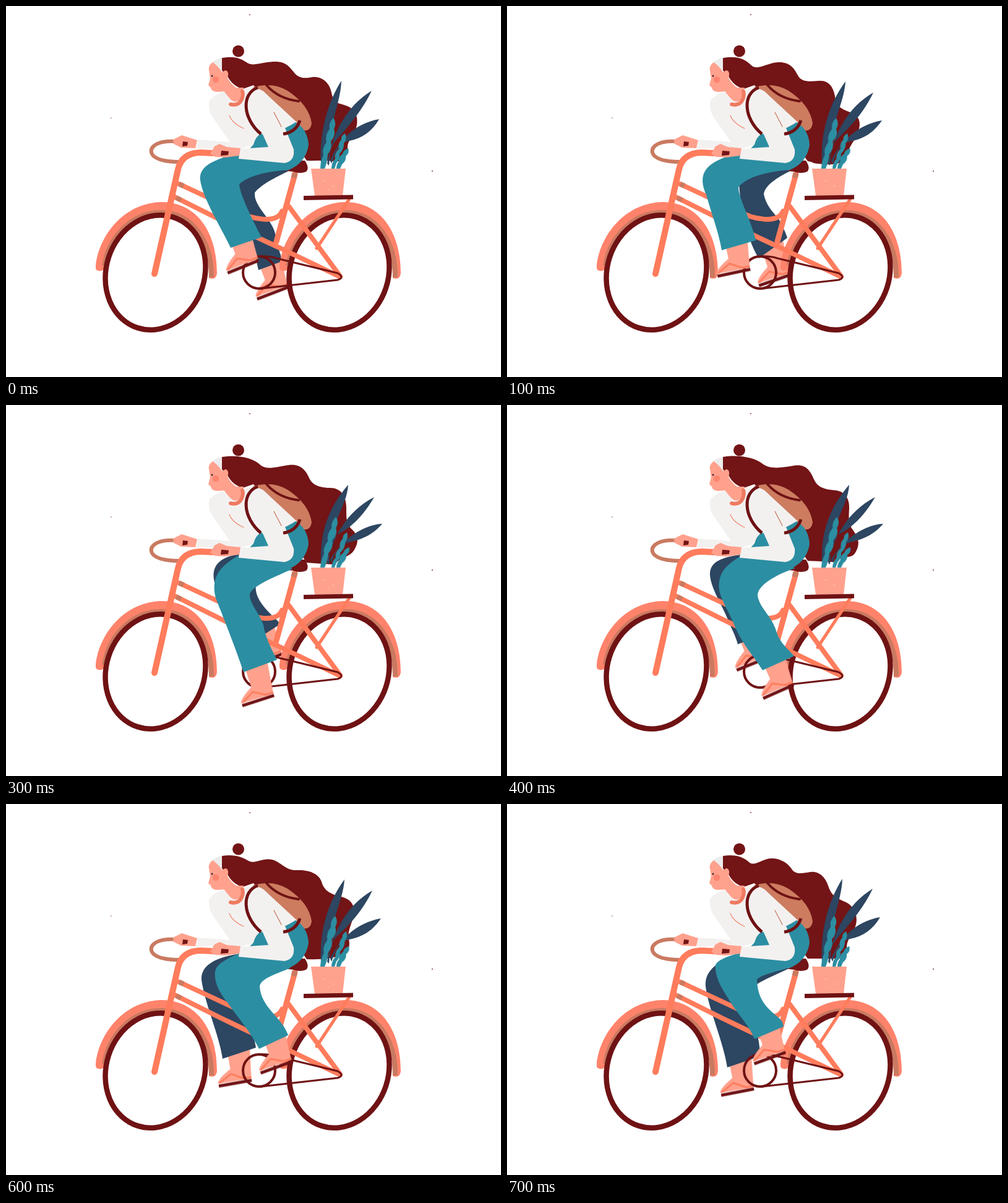
These frames come from a looping animation (800 px wide and 600 px high, 0.8 s). An HTML page:

```html
<!DOCTYPE html>
<html lang="en">
<head>
<meta charset="utf-8">
<title>Cyclist</title>
<style>
html, body { margin: 0; width: 100%; height: 100%; overflow: hidden; background: #fff; }
svg { display: block; width: 100%; height: 100%; }
.wine { fill: #731416; }
.coral { fill: #ff836b; }
.skin { fill: #ffa18d; }
.shirt { fill: #f3f1f0; }
.teal { fill: #2c8ea2; }
.navy { fill: #2d4661; }
.line { fill: none; stroke-linecap: round; stroke-linejoin: round; }
.flat { stroke-linecap: butt; }
.tube { stroke: #ff7c5c; }
.dark { stroke: #6f1214; }
.shade { stroke: #c97a61; }

.hair, .far-leg, .near-leg, .far-foot, .near-foot, .blades, .fronds {
  animation: .8s step-end infinite;
}
.hair { animation-name: hair; }
.far-leg { animation-name: far-leg; }
.near-leg { animation-name: near-leg; }
.far-foot { animation-name: far-foot; }
.near-foot { animation-name: near-foot; }
.blades { animation-name: blades; }
.fronds { animation-name: fronds; transform-origin: 522px 262px; }

@keyframes hair {
  0% { d: path("M349 84C372 80 381 86 390 92S412 91 432 90S458 98 466 108S484 117 495 115S522 120 526 140S538 156 552 162S571 182 565 200S552 216 552 230S546 253 528 251S500 251 486 250L400 128L383 134Q366 130 357 112L349 104Z"); }
  12.5% { d: path("M349 84C375 80 385 87 395 96S420 92 438 91S464 100 470 112S490 122 504 121S527 128 530 146S542 167 555 172S573 186 568 202S556 222 552 234S545 258 515 256S500 253 486 251L400 128L383 134Q366 130 357 112L349 104Z"); }
  25% { d: path("M349 84C375 80 395 86 405 97S435 97 452 94S478 104 483 115S502 130 518 129S546 142 546 160S548 184 558 190S571 210 565 225S545 240 530 262L486 258L400 128L383 134Q366 130 357 112L349 104Z"); }
  37.5% { d: path("M349 84C375 80 398 85 410 96S440 99 458 97S485 106 490 118S508 134 524 134S550 146 550 166S550 192 560 202S570 222 563 234S545 244 530 258L486 255L400 128L383 134Q366 130 357 112L349 104Z"); }
  50% { d: path("M349 84C375 80 400 85 413 95S445 101 464 98S490 106 496 120S515 137 530 138S554 150 553 168S552 192 559 202S572 222 564 237S545 240 530 254L486 252L400 128L383 134Q366 130 357 112L349 104Z"); }
  62.5% { d: path("M349 84C372 80 384 84 396 89S418 90 432 97S456 105 472 102S500 110 504 122S518 141 534 143S562 154 558 174S553 198 557 206S566 230 560 238S540 240 530 254L486 252L400 128L383 134Q366 130 357 112L349 104Z"); }
  75% { d: path("M349 84C370 81 382 86 392 92S415 86 430 90S452 108 470 107S506 112 510 126S524 146 542 150S566 168 561 184S552 208 554 218S556 240 540 245S510 252 486 251L400 128L383 134Q366 130 357 112L349 104Z"); }
  87.5% { d: path("M349 84C370 81 382 86 391 94S412 89 426 88S454 95 460 105S478 112 490 110S514 116 519 132S532 152 546 158S569 180 563 198S550 216 549 232S544 250 530 250S500 250 486 250L400 128L383 134Q366 130 357 112L349 104Z"); }
}
@keyframes near-leg {
  0% { d: path("M455 265C430 267 395 272 377 288C378 305 398 345 413 374L363 391C350 362 318 312 314 282C311 252 350 246 400 230Z"); }
  12.5% { d: path("M455 265C425 268 390 274 374 293C374 310 396 350 402 379L347 395C342 365 330 335 322 305C300 255 345 246 400 230Z"); }
  25% { d: path("M460 266C430 285 400 290 382 302C378 315 398 335 397 350C398 375 408 395 411 411L355 426C348 390 328 340 321 300C313 260 365 247 400 230Z"); }
  37.5% { d: path("M463 265C435 278 402 290 394 305C393 322 410 336 416 356C420 380 432 400 438 412L384 432C372 396 352 345 340 315C325 265 365 250 400 230Z"); }
  50% { d: path("M466 264C440 272 405 290 405 308C408 328 425 338 434 362C440 385 455 395 464 406L413 429C395 400 378 385 365 350C350 318 340 305 343 285C348 258 370 250 400 230Z"); }
  62.5% { d: path("M466 264C445 275 412 285 415 305C418 325 435 338 440 352C448 370 458 380 465 389L416 411C400 385 380 355 363 335C345 315 338 300 339 285C342 262 370 248 400 230Z"); }
  75% { d: path("M460 265C440 274 412 281 410 295C412 320 428 333 440 348Q452 362 456 374L409 396C396 370 377 348 360 324C342 302 336 285 338 270C343 252 372 246 400 230Z"); }
  87.5% { d: path("M455 265C440 270 410 276 404 284C405 315 418 328 437 344Q446 350 447 360L400 380C390 355 372 340 356 312C340 288 336 272 337 260C345 246 375 244 400 230Z"); }
}
@keyframes far-leg {
  0% { d: path("M468 262C440 274 410 290 402 302C400 325 432 345 436 372C440 395 446 405 446 413L408 427C402 400 395 370 388 340C380 315 370 280 375 260Z"); }
  12.5% { d: path("M468 262C440 275 418 288 415 304C420 330 440 340 443 352Q450 365 453 375L407 408C385 375 372 300 375 262Z"); }
  25% { d: path("M462 264C435 276 412 287 410 297C425 320 440 335 467 356L425 392Q395 372 384 345C370 320 335 285 346 256L378 241Z"); }
  37.5% { d: path("M455 262C435 272 410 280 404 290C400 315 425 335 444 354L400 382C385 355 355 325 342 300C328 270 335 247 378 241Z"); }
  50% { d: path("M455 262L378 242C350 246 327 252 328 275C330 300 352 330 360 355Q370 375 373 387L410 372L400 290Z"); }
  62.5% { d: path("M455 262L378 242C345 246 312 250 313 275C316 305 335 350 346 393L395 377C385 350 370 320 365 290Z"); }
  75% { d: path("M455 262C435 273 405 282 385 294C388 335 400 370 404 394L350 412C345 375 322 325 316 285C314 258 345 247 378 242Z"); }
  87.5% { d: path("M460 264C435 276 415 284 403 292L385 300C390 340 409 365 409 408L356 426C350 385 325 330 321 295C320 275 330 266 345 255L378 242Z"); }
}
@keyframes near-foot {
  0% { transform: translate(407px, 411px) rotate(-22deg); }
  12.5% { transform: translate(392px, 425px) rotate(-12deg); }
  25% { transform: translate(397px, 461px) rotate(-11deg); }
  37.5% { transform: translate(432px, 469px) rotate(-18deg); }
  50% { transform: translate(462px, 452px) rotate(-24deg); }
  62.5% { transform: translate(467px, 433px) rotate(-20deg); }
  75% { transform: translate(461px, 416px) rotate(-20deg); }
  87.5% { transform: translate(449px, 401px) rotate(-20deg); }
}
@keyframes far-foot {
  0% { transform: translate(455px, 454px) rotate(-21deg); }
  12.5% { transform: translate(457px, 434px) rotate(-19deg); }
  25% { transform: translate(469px, 413px) rotate(-22deg); }
  37.5% { transform: translate(445px, 402px) rotate(-22deg); }
  50% { transform: translate(420px, 408px) rotate(-22deg); }
  62.5% { transform: translate(391px, 425px) rotate(-13deg); }
  75% { transform: translate(396px, 446px) rotate(-10deg); }
  87.5% { transform: translate(398px, 460px) rotate(-11deg); }
}
@keyframes blades {
  0%, 87.5% { d: path("M509 255C506 205 520 155 542 121C541 155 524 185 516 258ZM519 255C528 205 550 162 591 137C578 165 556 192 538 212S525 235 522 258ZM524 250C536 220 562 190 603 183C592 203 575 214 555 218S532 240 526 255Z"); }
  12.5%, 75% { d: path("M509 255C506 205 521 157 547 122C545 157 524 187 516 258ZM519 255C528 208 550 164 592 140C579 168 557 194 539 210S525 235 522 258ZM524 250C537 222 565 192 606 185C592 206 575 215 555 219S532 240 526 255Z"); }
  25%, 37.5%, 50% { d: path("M509 255C507 205 522 165 553 129C551 165 523 190 516 258ZM519 255C528 215 550 172 595 149C580 175 560 197 540 207S525 235 522 258ZM524 250C538 225 570 195 608 192C592 211 575 217 555 222S532 240 526 255Z"); }
  62.5% { d: path("M509 255C507 205 522 161 551 123C549 161 523 188 516 258ZM519 255C528 212 550 169 590 148C578 173 558 196 540 209S525 235 522 258ZM524 250C538 223 567 194 608 188C592 208 575 216 555 221S532 240 526 255Z"); }
}
@keyframes fronds {
  0%, 87.5% { transform: none; }
  12.5%, 75% { transform: skewX(-2deg); }
  25%, 37.5%, 50% { transform: skewX(-3deg); }
  62.5% { transform: skewX(-2.5deg); }
}
</style>
</head>
<body>
<svg viewBox="0 0 800 600">
  <defs>
    <g id="wheel">
      <path class="coral" d="M145 420C150 372 190 318 252 317C312 318 341 370 341 432Q340 441 333 441L328 440C330 390 305 334 250 332C205 332 172 370 159 424Q156 430 149 428Q144 427 145 420Z"/>
      <path class="line flat shade" stroke-width="8" d="M159 420C166 374 203 334 250 334C304 334 333 385 332 439"/>
      <ellipse class="line dark" stroke-width="8.5" cx="241.5" cy="431" rx="79.5" ry="94" transform="rotate(18 241.5 431)"/>
    </g>
    <g id="foot">
      <path class="skin" d="M-54 -3Q-52 -11 -30 -23L-30 -58L8 -58L3 -20L1 -2Z"/>
      <path class="line tube" stroke-width="3" d="M-50 -4L-30 -15L-11 -4H0"/>
      <path class="line flat dark" stroke-width="5" d="M-53 1H1"/>
    </g>
  </defs>

  <g fill="#8a4a45">
    <circle cx="394" cy="14" r="1"/>
    <circle cx="689" cy="267" r="1.1"/>
    <circle cx="170" cy="181" r=".8"/>
  </g>

  <path class="hair wine" d="M349 84Z"/>
  <path class="line shade" stroke-width="6" d="M274 219C240 217 227 232 239 243Q250 252 279 252"/>

  <use href="#foot" class="far-foot"/>
  <path class="far-leg navy" d="M455 262Z"/>

  <use href="#wheel"/>
  <use href="#wheel" x="297"/>

  <!-- frame -->
  <g class="line tube">
    <path stroke-width="5" d="M555 312L502 392"/>
    <path stroke-width="8" d="M457 324L540 437"/>
    <path stroke-width="8" d="M280 288L370 330C400 347 438 352 446 332"/>
    <path stroke-width="8" d="M273 309L345 345C380 362 400 372 440 390L540 438"/>
    <path stroke-width="9" d="M467 272L437 381"/>
    <path stroke-width="10" d="M240 433L278 264Q284 238 314 237L335 238"/>
  </g>
  <path class="line flat shade" stroke-width="9" d="M467 270L465 278"/>
  <path class="line flat shade" stroke-width="8" d="M280 288L287 291M275 310L283 314"/>
  <g class="line dark">
    <circle stroke-width="4" cx="409" cy="431" r="26"/>
    <path stroke-width="3" d="M409 405Q425 404 437 408L536 432Q548 439 536 443L412 457"/>
  </g>
  <path class="wine" d="M448 266Q468 262 470 250L483 250Q491 262 485 268Q475 272 464 268Z"/>

  <!-- plant -->
  <path class="blades navy" d="M511 262Z"/>
  <g class="fronds teal">
    <path d="M529 181Q535 189 530 199Q534 209 525 219Q528 230 520 240Q520 251 515 263L508 263Q508 251 513 241Q510 231 518 220Q515 209 523 199Q521 189 529 181Z"/>
    <path d="M548 206Q552 214 546 222Q547 231 539 239Q540 248 534 254L531 263L526 263Q526 253 532 247Q530 239 538 231Q536 222 542 216Q541 210 548 206Z"/>
    <path d="M553 230Q556 237 549 243Q550 251 543 256L540 263L534 263Q534 256 538 251Q537 244 544 239Q545 233 553 230Z"/>
  </g>
  <path class="skin" d="M493 263H549L544 307H499Z"/>
  <g fill="#ffc9bc">
    <circle cx="515" cy="283" r="1"/>
    <circle cx="529" cy="291" r="1"/>
    <circle cx="521" cy="296" r=".8"/>
  </g>
  <path class="line flat dark" stroke-width="7" d="M481 310.5L561 309"/>

  <!-- backpack and torso -->
  <path fill="#cd7c60" d="M398 132Q430 122 455 137Q490 160 494 190Q492 204 478 201L455 197L425 150Z"/>
  <path class="line dark" stroke-width="4" d="M421 128Q440 150 473 154"/>
  <path class="skin" d="M350 132L384 132L381 150L368 160L358 150Z"/>
  <path class="shirt" d="M329 152Q340 142 352 138L362 150Q372 160 381 148L384 136Q402 128 416 138L470 188L450 208Q420 208 402 224L378 231L307 230L310 216L362 220L334 180Q325 165 329 152Z"/>
  <path class="line" stroke="#ef7a60" stroke-width="6" d="M363 159Q376 162 381 151Q384 144 382 138"/>
  <path class="line" stroke="#f08d76" stroke-width="1.3" d="M361 177Q365 189 384 198"/>

  <use href="#foot" class="near-foot"/>
  <path class="near-leg teal" d="M455 266Z"/>
  <path class="teal" d="M400 224Q403 212 411 207Q440 206 468 188Q488 200 489 225Q484 255 455 266L400 262L385 240Z"/>

  <!-- arms and straps -->
  <path class="shirt" d="M392 150Q398 132 416 138Q432 152 440 170L465 232Q467 251 450 254L376 247L378 231L424 228L408 192Z"/>
  <path class="line" stroke="#c9785f" stroke-width="1.3" d="M433 172L445 195"/>
  <g class="line flat dark" stroke-width="5">
    <path d="M407 132C380 141 382 182 412 207"/>
    <path d="M448 207Q469 204 475 185"/>
  </g>
  <path class="skin" d="M270 216L284 209L309 217L306 230L283 229L271 223Z"/>
  <path class="skin" d="M330 239L337 227L345 223L357 228L379 230L377 242L354 245L338 244Z"/>
  <path class="wine" d="M286 219L294 220L293 226L285 227ZM348 234L360 235L359 241L347 242Z"/>

  <!-- head -->
  <path class="skin" d="M335 90Q326 97 328 104L330 117L327 128L331 132Q332 139 342 139L354 138L378 137L368 129Q360 122 356 112L350 106Z"/>
  <path fill="#ececec" d="M334 91Q341 84 349 84L349 107Q344 98 334 91Z"/>
  <ellipse class="skin" cx="354" cy="112" rx="5" ry="8" transform="rotate(12 354 112)"/>
  <circle cx="339" cy="119" r="5.2" fill="#fb8570"/>
  <circle cx="333" cy="113" r="1.5" fill="#3d2530"/>
  <circle class="wine" cx="375.5" cy="73" r="9.5"/>
</svg>
</body>
</html>
```
